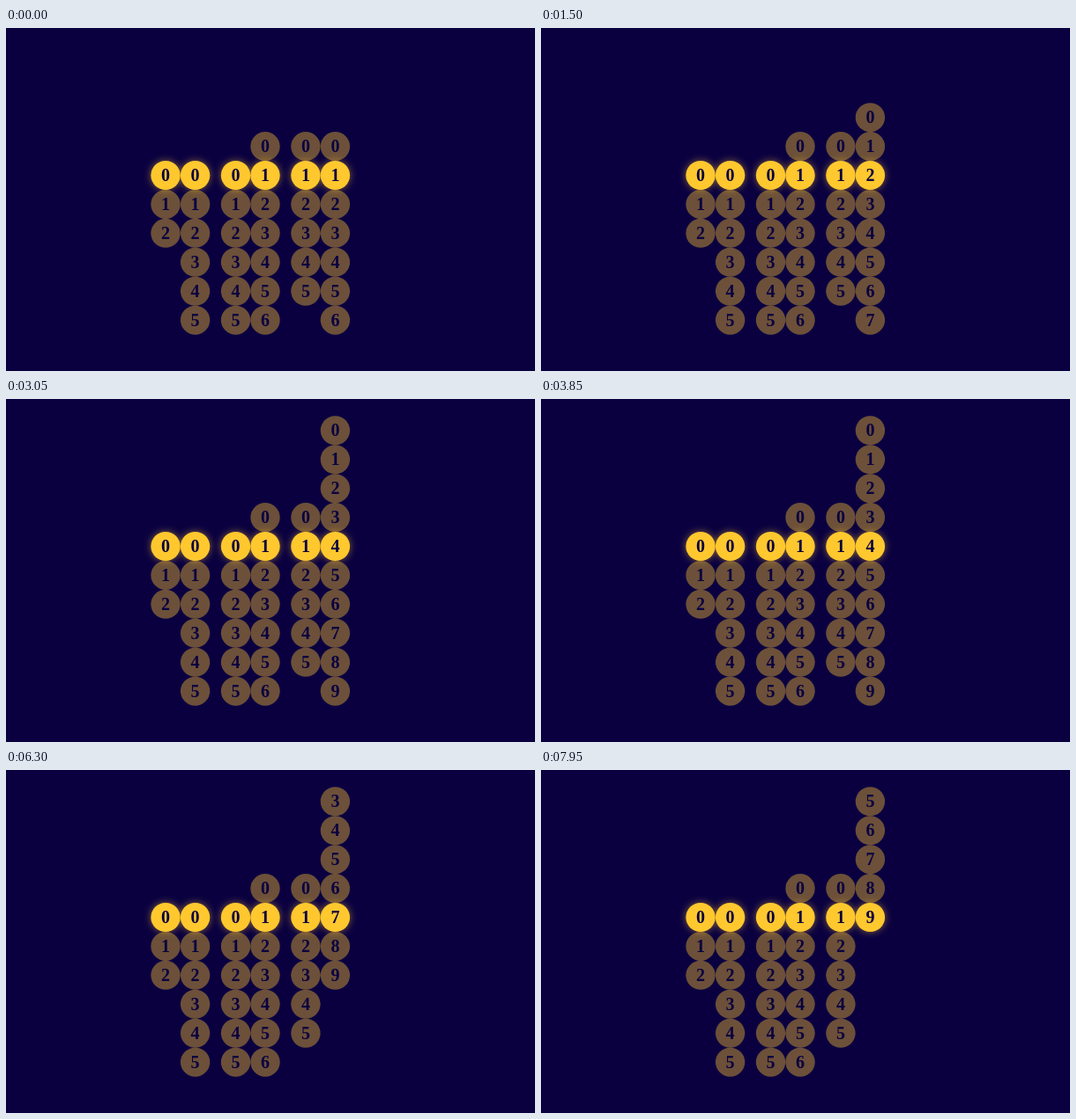
These frames come from a looping animation (600x390 px, 8000 ms). An HTML page:

```html
<!DOCTYPE html>
<html lang="en">
<head>
<meta charset="utf-8">
<title>Column clock</title>
<style>
  html, body { margin: 0; width: 100%; height: 100%; overflow: hidden; background: #0a0040; }
  svg { display: block; }
  ellipse { fill: #ffc82e; }
  text { fill: #0a0040; font: bold 20px "Liberation Serif", "Times New Roman", serif; text-anchor: middle; }
  .dim ellipse { opacity: .4; }
  .lit ellipse { filter: drop-shadow(0 0 4px rgba(255, 200, 46, .5)); }
</style>
</head>
<body>
<svg id="clock" width="600" height="390" viewBox="0 0 600 390"></svg>
<script>
  const LOOP = 8000, TICK = 1000, LEAD = 50;
  const ROW = 32.93, ACTIVE_Y = 167.5, ABOVE = 4, BELOW = 5;
  const clock = document.getElementById('clock');

  // x centre, highest digit, shown digit
  const columns = [
    [181, 2, 0], [214.6, 9, 0],
    [260.5, 5, 0], [294, 9, 1],
    [339.9, 5, 1], [373.4, 9, 1]
  ];

  function cell(x, digit, offset) {
    const y = ACTIVE_Y + offset * ROW;
    return `<g class="${offset ? 'dim' : 'lit'}">` +
      `<ellipse cx="${x}" cy="${y}" rx="16.7" ry="16.5"/>` +
      `<text x="${x}" y="${y + 6.6}">${digit}</text></g>`;
  }

  function column([x, max, value]) {
    const first = Math.max(0, value - ABOVE);
    const last = Math.min(max, value + BELOW);
    let out = cell(x, value, 0);
    for (let d = first; d <= last; d++) {
      if (d !== value) out += cell(x, d, d - value);
    }
    return out;
  }

  const groups = columns.map(col => {
    const g = document.createElementNS('http://www.w3.org/2000/svg', 'g');
    g.innerHTML = column(col);
    return clock.appendChild(g);
  });

  const [x, max] = columns[5];
  let shown = 1;
  const start = performance.now();

  function frame() {
    const t = (performance.now() - start) % LOOP;
    const second = 1 + Math.floor((t + LEAD) / TICK);
    if (second !== shown) {
      shown = second;
      groups[5].innerHTML = column([x, max, second]);
    }
    requestAnimationFrame(frame);
  }
  frame();
</script>
</body>
</html>
```
